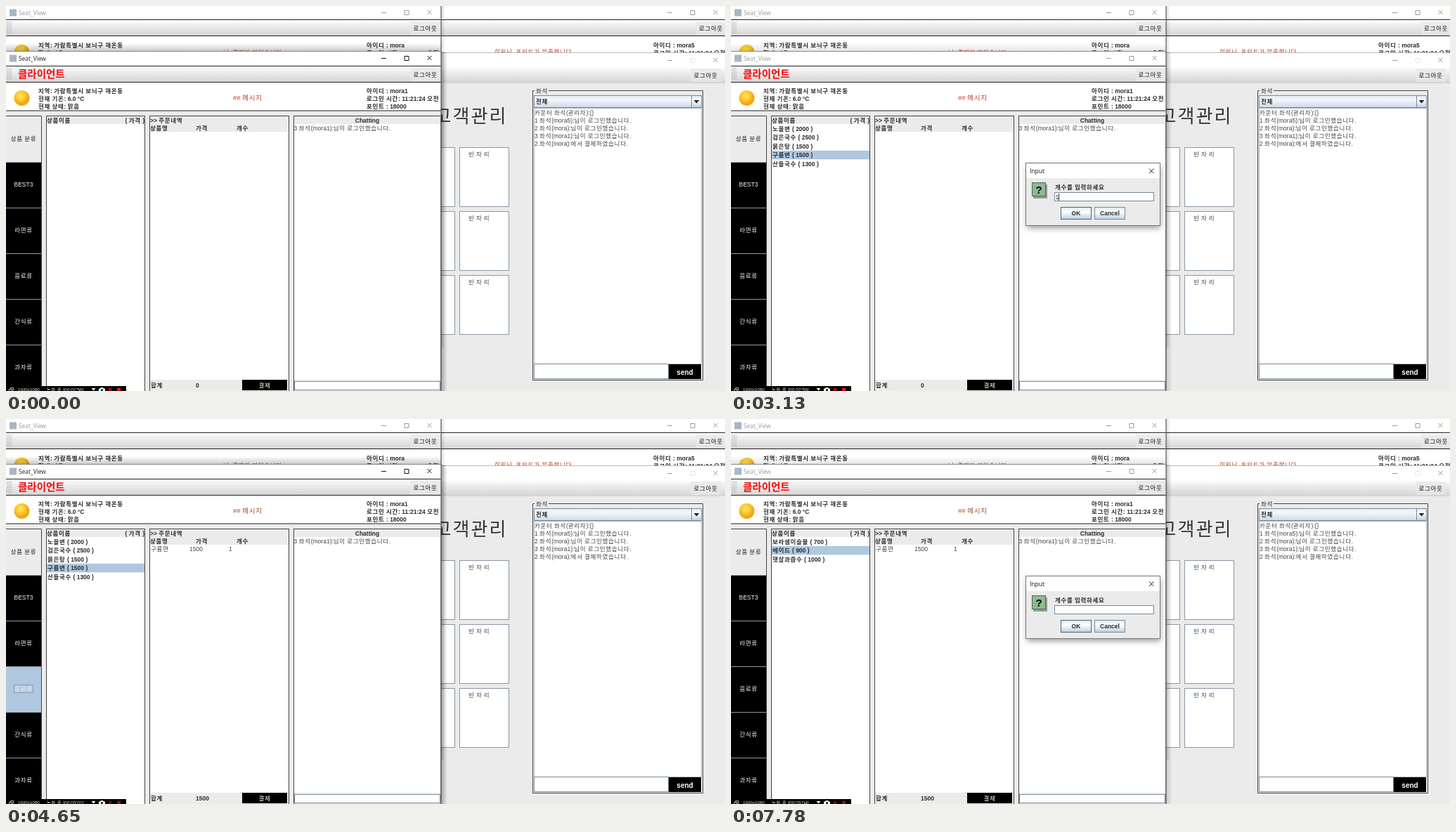
An HTML page that plays this animation: 1023x548 px, repeating every 8000 ms.

```html
<!DOCTYPE html>
<html lang="ko">
<head>
<meta charset="utf-8">
<title>Seat_View</title>
<style>
html, body { margin: 0; width: 100%; height: 100%; overflow: hidden; background: #ebebeb; }
svg { display: block; width: 100%; height: 100%; }
text { font-family: "Liberation Sans", "Noto Sans CJK KR", "Noto Sans CJK", sans-serif; white-space: pre; }
.ui { font-family: "Open Sans", "Noto Sans CJK KR", sans-serif; }
.wide { letter-spacing: .08em; }
</style>
</head>
<body>
<svg id="stage" viewBox="0 0 1023 548"></svg>
<script>
const LOOP = 8000, SIZE = 8.53;
const GRAY = '#ebebeb', INK = '#2b2b2b', EDGE = '#7a8a99', BLUE = '#b0c7e0';

const rect = (x, y, w, h, fill, extra = '') =>
  `<rect x="${x}" y="${y}" width="${w}" height="${h}" fill="${fill}" ${extra}/>`;
const box = (x, y, w, h, fill, stroke = '#444') =>
  rect(x + .5, y + .5, w - 1, h - 1, fill, `stroke="${stroke}"`);
const path = (d, stroke, extra = '') => `<path d="${d}" fill="none" stroke="${stroke}" ${extra}/>`;
const group = (id, body, extra = '') => `<g id="${id}" ${extra}>${body}</g>`;
// Hangul runs are set on a full-em pitch
const hangul = s => s.replace(/>/g, '&gt;').replace(/[가-힣]+/g, '<tspan class="wide">$&</tspan>');

// y is the vertical middle of the line
function text(x, y, s, { size = SIZE, bold, fill = INK, anchor = 'start', cls = '', id = '' } = {}) {
  const tight = cls === 'ui' || cls === 'plain';
  return `<text x="${x}" y="${y + size * .36}" font-size="${size}" fill="${fill}" text-anchor="${anchor}"
    ${bold ? 'font-weight="700"' : ''} class="${cls}" ${id && `id="${id}"`}>${tight ? s : hangul(s)}</text>`;
}
const strong = (x, y, s, o = {}) => text(x, y, s, { bold: true, ...o });

function captionButtons(x, y, color, maxColor = color) {
  return path(`M${x - 3.5} ${y + .5}h7`, color) +
    path(`M${x + 29.5} ${y - 2.5}h6v6h-6z`, maxColor) +
    path(`M${x + 62} ${y - 3}l6 6m0 -6l-6 6`, color);
}

function toolbar(x, y, w, labelX) {
  return rect(x, y, w, 23, 'url(#bar)') +
    rect(labelX - 4, y + 2, 43, 19, '#e9e9e9', 'opacity=".75"') +
    text(labelX, y + 11.5, '로그아웃', { fill: '#111' });
}

const titleBar = (y, fill, id) =>
  rect(5, y - 5, 10, 10, '#a9b5c2') + text(18, y, 'Seat_View', { size: 8.4, cls: 'ui', fill, id });

const sun = y => `<circle cx="22.5" cy="${y}" r="14" fill="url(#glow)"/><circle cx="22.5" cy="${y}" r="10.8" fill="url(#sun)"/>`;
const grip = y => rect(1, y + 2, 7, 18, 'url(#dots)');

function info(x, y, id, lines) {
  return [`아이디 : ${id}`, '로그인 시간: 11:21:24 오전', '포인트 : 18000'].slice(0, lines)
    .map((s, i) => strong(x, y + 11 * i, s)).join('');
}
function weather(y, lines) {
  return ['지역: 가람특별시 보늬구 해온동', '현재 기온: 6.0 °C', '현재 상태: 맑음'].slice(0, lines)
    .map((s, i) => strong(46, y + 11 * i, s)).join('');
}

const defs = `<defs>
  <linearGradient id="bar" x2="0" y2="1"><stop stop-color="#fff"/><stop offset=".25" stop-color="#f1f1f1"/><stop offset="1" stop-color="#d3d3d3"/></linearGradient>
  <linearGradient id="metal" x2="0" y2="1"><stop stop-color="#dde8f3"/><stop offset=".4" stop-color="#fff"/><stop offset="1" stop-color="#b8cfe5"/></linearGradient>
  <linearGradient id="combo" x2="0" y2="1"><stop stop-color="#e4edf5"/><stop offset=".35" stop-color="#f3f6f9"/><stop offset="1" stop-color="#cbdae9"/></linearGradient>
  <linearGradient id="side"><stop stop-color="#000" stop-opacity=".3"/><stop offset="1" stop-color="#000" stop-opacity="0"/></linearGradient>
  <linearGradient id="above" x2="0" y2="1"><stop stop-color="#000" stop-opacity="0"/><stop offset="1" stop-color="#000" stop-opacity=".22"/></linearGradient>
  <radialGradient id="sun" cx=".42" cy=".36"><stop stop-color="#ffe45a"/><stop offset=".6" stop-color="#fcc92e"/><stop offset="1" stop-color="#f3a41c"/></radialGradient>
  <radialGradient id="glow"><stop offset=".7" stop-color="#fbe9a8"/><stop offset="1" stop-color="#fff" stop-opacity="0"/></radialGradient>
  <pattern id="dots" width=".4286" height=".1667"><rect width="1.2" height="1.2" fill="#aaa"/><rect x="1.5" y="1.5" width="1.2" height="1.2" fill="#bbb"/></pattern>
  <clipPath id="front"><path d="M0 0H618.5V548H0z"/></clipPath>
  <filter id="blur" x="-20%" y="-20%" width="140%" height="150%"><feGaussianBlur stdDeviation="4"/></filter>
</defs>`;

function rightSide() {
  let s = rect(619, 0, 404, 67, '#fff') + captionButtons(944.5, 9, '#999') + toolbar(619, 20, 404, 986) +
    path('M619 19.5h404M619 42.5h404', '#222') + info(921, 56, 'mora5', 2) +
    text(695, 66, '회원님, 포인트가 부족합니다', { size: 8.6, cls: 'accent' });
  s += rect(619, 67, 404, 481, GRAY) + rect(619, 67, 404, 20, '#fff') + path('M619 66.5h404', '#bbb') +
    captionButtons(944.5, 77, '#999', '#e6e6e6') + toolbar(619, 87, 404, 978.5) +
    text(609.5, 157, '고객관리', { size: 26, fill: '#333' });
  for (const y of [201, 292, 383])
    s += box(569, y, 70, 85, '#fff', '#8b98a5') + box(645, y, 71, 85, '#fff', '#8b98a5') +
      text(658, y + 10, '빈 자 리', { fill: '#444' });
  s += path('M752 120.5H749.5V532.5H991.5V120.5H772', '#444') + text(754, 121, '좌석') +
    box(751, 127, 239, 18, 'url(#combo)', EDGE) + box(975, 127, 15, 18, 'url(#metal)', EDGE) +
    `<path d="M978.5 134h8l-4 4.5z" fill="#222"/>` + strong(754, 136, '전체') +
    box(751, 145, 239, 365, '#fff', '#a9b3bd') + box(751, 509, 192, 22, '#fff', EDGE) +
    rect(943, 510, 46, 21, '#000') + strong(966, 521, 'send', { size: 10, fill: '#fff', anchor: 'middle' });
  const login = (n, id) => `${n} 좌석(${id}):님이 로그인했습니다.`;
  ['카운터 좌석(관리자):{}', login(1, 'mora5'), login(2, 'mora'), login(3, 'mora1'), '2 좌석(mora):에서 결제하였습니다.']
    .forEach((line, i) => s += text(752, 152 + 11 * i, line, { fill: '#444' }));
  return s;
}

function backWindow() {
  return rect(0, 0, 619, 65, '#fff') + titleBar(9.5, '#999', 'backTitle') + captionButtons(537.5, 9, '#999') +
    toolbar(0, 20, 619, 579.5) + grip(20) + path('M0 19.5h619M0 42.5h619', '#222') +
    sun(66) + weather(56, 2) + info(513, 56, 'mora', 2) +
    text(309, 66, '님, 결제가 되었습니다', { cls: 'accent' });
}

const categories = ['BEST3', '라면류', '음료류', '간식류', '과자류'];
function categoryButton(label, i) {
  const y = 222 + 65 * i;
  return rect(0, y, 50, 65, '#000', `id="face${i}"`) + path(`M0 ${y + .5}h50`, '#8d98a3') +
    path(`M1.5 ${y + 1.5}h46.5v62h-46.5z`, '#8fa6bf', `id="hover${i}" stroke-width="2"`) +
    path(`M11.5 ${y + 26.5}h27v11h-27z`, '#8ea0b4', `id="focus${i}"`) +
    text(25, y + 32, label, { fill: '#f4f4f4', anchor: 'middle' });
}

function frontWindow() {
  let s = rect(0, 65, 619, 483, GRAY) + rect(0, 65, 619, 20, '#fff') + titleBar(74.5, '#222', 'title') +
    group('caption', captionButtons(537.5, 74, 'currentColor')) +
    toolbar(0, 86, 619, 579.5) + grip(86) +
    strong(17, 96.5, '클라이언트', { size: 14.5, fill: '#f50a0a', cls: 'plain' }) +
    rect(0, 109, 619, 40, '#fff') + path('M0 85.5h619M0 108.5h619M0 149h619', '#222') +
    sun(131) + weather(121, 3) + info(513, 121, 'mora1', 3) +
    text(323, 131, '## 메시지', { size: 9.5, cls: 'accent' });

  s += path('M0 156.5H50.5V548', '#444') + text(25, 189, '상품 분류', { anchor: 'middle', fill: '#222' }) +
    categories.map(categoryButton).join('');

  s += box(57, 156, 141, 400, '#fff') + rect(58, 157, 139, 11, GRAY) +
    strong(58, 162.5, '상품이름') + strong(197, 162.5, '( 가격 )', { anchor: 'end' }) +
    rect(58, 0, 139, 12.5, BLUE, 'id="pick"') + group('items', '');

  s += box(204, 156, 199, 400, '#fff') + rect(205, 157, 197, 22, GRAY) + strong(205, 163, '>> 주문내역') +
    strong(205, 174, '상품명') + strong(270, 174, '가격') + strong(328, 174, '개수') +
    group('order', text(206, 185, '구름면') + text(261, 185, '1500') + text(317, 185, '1'), 'opacity=".9"') +
    rect(205, 532, 197, 16, GRAY) + strong(206, 540, '합계') + strong(270, 540, '0', { id: 'total' }) +
    rect(336, 532, 64, 15, '#000') + text(368, 540, '결제', { fill: '#fff', anchor: 'middle' });

  s += box(409, 156, 210, 400, '#fff') + rect(410, 157, 208, 11, GRAY) +
    strong(514, 163, 'Chatting', { anchor: 'middle' }) +
    text(409.5, 174, '3 좌석(mora1):님이 로그인했습니다.', { fill: '#444' }) +
    rect(410, 532, 208, 16, GRAY) + box(410, 534, 208, 13, '#fff', EDGE);
  return s;
}

function dialog() {
  const button = (x, label, stroke) => box(x, 286, 44, 18, 'url(#metal)', stroke) +
    strong(x + 22, 295, label, { anchor: 'middle' });
  return rect(421, 228, 190, 88, '#000', 'opacity=".4" filter="url(#blur)"') +
    box(419, 223, 192, 90, GRAY, '#777') + rect(420, 224, 190, 21, '#fff') +
    text(425, 235, 'Input', { cls: 'ui', fill: '#111' }) + path('M595 231.5l6.5 6.5m0 -6.5l-6.5 6.5', '#222') +
    rect(430, 254, 20, 20, '#999') + box(428, 251, 20, 20, '#8fb893', '#466b4c') +
    strong(438, 261.5, '?', { size: 15, fill: '#000', anchor: 'middle' }) +
    strong(461, 258, '개수를 입력하세요') + box(460, 265, 142, 13, '#fff', EDGE) +
    text(461.5, 272, '1', { id: 'typed' }) + path('M0 267v10', '#222', 'id="caret"') +
    button(469, 'OK', '#4f6377') + button(517, 'Cancel', EDGE);
}

function recorder() {
  return rect(0, 541, 171, 7, '#000') + path('M4.5 545.5h4v3h-4zM6.5 545v-1.5h4v3.5h-2', '#ddd', 'stroke-width=".8"') +
    text(17, 546.2, '1920x1080', { size: 6.2, fill: '#ddd' }) +
    text(110.5, 546.2, '', { size: 6.6, fill: '#ddd', anchor: 'end', id: 'clock' }) +
    `<path d="M121.5 544h6l-3 3.5z" fill="#fff"/><path d="M132 544.5h2l1-1.5h3l1 1.5h2v4h-9z" fill="#fff"/>
     <circle cx="136.5" cy="546.5" r="1.5" fill="#000"/>
     <path id="rec" d="M146 543.5h1.5v5h-1.5zM148.5 543.5h1.5v5h-1.5zM158 543.5h5v5h-5z"/>`;
}

const stage = document.getElementById('stage');
stage.innerHTML = defs + rightSide() + `<g clip-path="url(#front)">${backWindow()}</g>` +
  group('shade', rect(619, 65, 9, 483, 'url(#side)') + rect(0, 53, 619, 12, 'url(#above)')) +
  rect(619, 0, 6, 486, 'url(#side)', 'opacity=".5"') +
  `<g clip-path="url(#front)">${frontWindow()}</g>` +
  path('M0 64.5H619', '#888') + path('M619 0V548', '#444') + group('dialog', dialog()) + recorder();

const $ = id => document.getElementById(id);
const set = (id, name, value) => $(id).setAttribute(name, value);
const show = (id, on) => set(id, 'visibility', on ? 'inherit' : 'hidden');
const within = (t, a, b) => t >= a && t < b;

const menus = {
  none: [],
  noodles: ['노을면 ( 2000 )', '검은국수 ( 2500 )', '붉은탕 ( 1500 )', '구름면 ( 1500 )', '산들국수 ( 1300 )'],
  drinks: ['보라샘이슬물 ( 700 )', '에이드 ( 900 )', '햇살과즙수 ( 1000 )'],
};
const ticks = [420, 1520, 2570, 3600, 4650, 5730, 6760, 7780];
let shownMenu;

function showMenu(name) {
  if (name === shownMenu) return;
  shownMenu = name;
  $('items').innerHTML = menus[name].map((s, i) => strong(59, 174.7 + 12.5 * i, s)).join('');
}

function render(t) {
  const asking = within(t, 2650, 3370) || t >= 6040;
  const active = !asking && !within(t, 3370, 3470);
  const ordered = t >= 3370;
  const late = t >= 4250;

  show('dialog', asking);
  set('title', 'fill', active ? '#222' : '#999');
  $('caption').style.color = active ? '#111' : '#999';
  set('shade', 'opacity', active ? 1 : .5);

  categories.forEach((_, i) => {
    const noodles = i === 1, drinks = i === 2;
    const pressed = noodles && within(t, 890, 1130) || drinks && within(t, 4650, 4840);
    const hover = noodles && (within(t, 160, 1270) || within(t, 3940, 4110)) || drinks && within(t, 4110, 5020);
    const focus = noodles && within(t, 890, 2650) || drinks && within(t, 4650, 6040);
    set('face' + i, 'fill', pressed ? BLUE : '#000');
    show('hover' + i, hover && !pressed);
    show('focus' + i, focus);
  });

  showMenu(t < 1130 ? 'none' : t < 4840 ? 'noodles' : 'drinks');
  const picked = within(t, 2650, 4840) ? 3 : t >= 6040 ? 1 : -1;
  const rowFocus = within(t, 2650, 2780) || within(t, 3470, 4650) || within(t, 6040, 6160);
  show('pick', picked >= 0);
  set('pick', 'y', 168.3 + 12.5 * Math.max(picked, 0));
  set('pick', 'stroke', rowFocus ? '#6382a6' : 'none');

  show('order', ordered);
  $('total').textContent = ordered ? '1500' : '0';

  const typed = within(t, 3130, 3370);
  show('typed', asking && typed);
  show('caret', asking && (within(t, 2860, 3370) || within(t, 6280, 6580) || within(t, 7090, 7610)));
  set('caret', 'transform', `translate(${typed ? 466.5 : 462} 0)`);

  const seconds = 176 + ticks.filter(k => t >= k).length;
  const two = n => String(n).padStart(2, '0');
  const clock = `녹화 중 [00:${two(Math.floor(seconds / 60))}:${two(seconds % 60)}]`;
  if ($('clock').textContent !== clock) $('clock').innerHTML = hangul(clock);

  for (const el of document.querySelectorAll('.accent')) el.style.fill = late ? '#a8492a' : '#c23a2c';
  set('rec', 'fill', late ? '#7d1a12' : '#f01010');
}

function tick(now) {
  render(now % LOOP);
  requestAnimationFrame(tick);
}
render(0);
requestAnimationFrame(tick);
</script>
</body>
</html>
```
